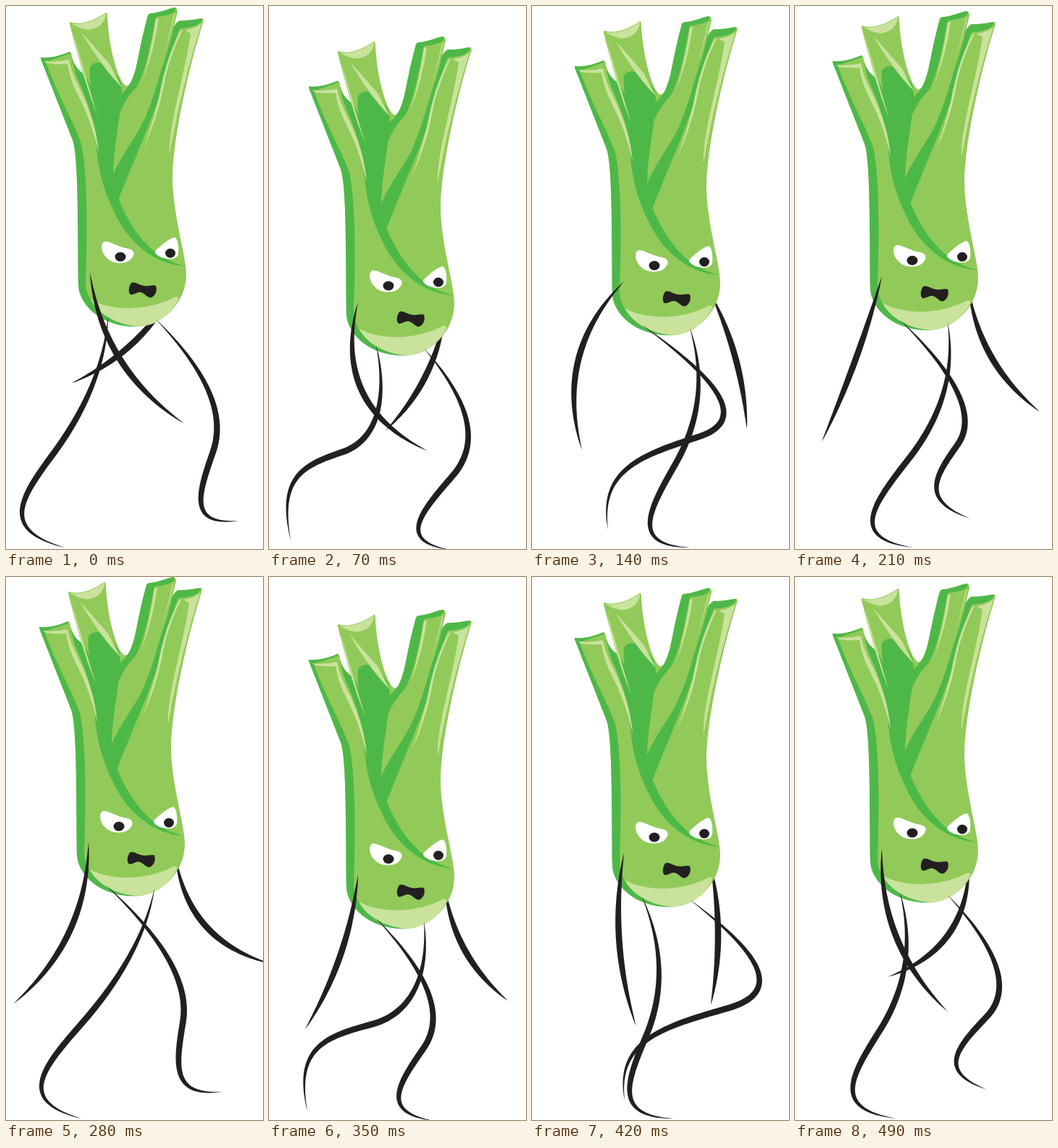
An HTML page with a canvas for the animation above (560 ms loop, 355 by 749 pixels).

```html
<!DOCTYPE html>
<html lang="en">
<head>
<meta charset="utf-8">
<title>Angry leek walking</title>
<style>
html, body { margin: 0; width: 100%; height: 100%; overflow: hidden; background: #fff; }
canvas { display: block; }
</style>
</head>
<body>
<canvas id="stage" width="355" height="749"></canvas>
<script>
const ctx = document.getElementById('stage').getContext('2d');
const STEP = 70, PHASES = 8;
const LIGHT = '#91ca58', DARK = '#4db848', PALE = '#c9e29c', INK = '#231f20', WHITE = '#fff';

// Body parts, back to front
const body = [
  // silhouette
  [LIGHT, `M48 73Q50 71 55 72C68 71 78 67 88 63Q91 64 91 70Q94 82 103 91L107 97L97 60L88 25
    Q87 21 92 23C106 26 124 19 138 9Q140 9 140 15C142 55 153 98 164 109Q168 112 172 106
    C181 88 187 45 196 13Q197 10 202 10C214 9 222 4 233 2Q237 3 237 8L230 36Q231 25 240 20
    C250 21 262 18 271 17Q274 18 272 23C254 80 230 180 230 240C231 290 249 345 249 370
    C249 410 215 442 180 442C130 442 100 410 100 385C100 290 99 205 92 185Z`],
  // shaded left side
  [DARK, `M48 73L92 185C100 205 99 290 100 385C102 415 135 445 186 442C140 436 112 410 110 385
    C113 300 112 225 104 190C96 165 70 120 55 77L88 66L88 63C76 68 64 72 48 71Z`],
  // shadow between the left stalks
  [DARK, 'M91 70Q94 84 104 91Q116 102 121 122L130 165L128 203Q124 160 104 112Q94 92 91 70Z'],
  // inner leaf and its long fold
  [DARK, `M116 84Q124 73 139 82Q151 91 158 104C165 128 150 175 148 232L156 268
    C172 305 198 348 248 359C205 357 168 325 150 285C132 250 125 215 124 180L130 168
    C120 130 114 100 116 84Z`],
  // right-hand fold
  [DARK, `M240 20C250 21 262 18 271 17C270 27 255 30 240 31C228 60 223 105 208 135
    C198 165 180 205 155 268L148 232C160 205 180 180 191 157C207 120 210 100 221 68
    Q229 43 231 32Q234 23 240 20Z`],
  // shaded edge of the third stalk
  [DARK, `M196 13Q197 10 202 10C214 9 222 4 233 2Q237 4 232 9Q222 14 207 15C201 45 195 85 181 111
    Q166 126 158 145L158 122Q176 108 181 80Q187 45 196 13Z`],
  // highlights
  [PALE, `M53 76Q70 78 87 74Q90 91 101 112Q125 160 128 203Q119 160 99 122Q88 101 85 80
    Q70 81 57 79Z`],
  [PALE, 'M90 24C106 27 124 20 138 10Q138 18 131 26C120 35 109 35 90 24Z'],
  [PALE, 'M104 36L143 80L160 112Q135 88 104 36Z'],
  [PALE, 'M92 35Q108 90 126 150Q104 95 92 35Z'],
  [PALE, 'M207 18L211 17Q205 60 189 102Q201 60 207 18Z'],
  [PALE, 'M234 9Q228 38 218 65Q227 36 232 12Z'],
  [PALE, 'M241 34L244 33Q226 68 217 115Q209 155 190 196Q208 145 214 112Q224 65 241 34Z'],
  [PALE, 'M247 33Q260 32 270 24C254 75 238 135 226 205C224 165 247 95 255 38Z'],
  [PALE, 'M117 405C150 422 197 420 232 402Q239 399 238 405C225 430 203 442 183 442C155 440 129 427 117 405Z'],
  // face
  [WHITE, `M134 326C140 321 150 331 170 335C180 338 177 345 172 350C165 356 150 356 142 350
    C132 343 130 330 134 326Z`],
  [WHITE, `M207 337C215 330 224 321 233 319C238 321 239 335 238 342C236 350 225 350 215 347
    C208 344 204 340 207 337Z`],
  [INK, 'M150.5 346a7.5 6.5 0 1 0 15 0a7.5 6.5 0 1 0 -15 0Z'],
  [INK, 'M220 341a7 6.5 0 1 0 14 0a7 6.5 0 1 0 -14 0Z'],
  [INK, `M173 382C178 379 185 386 192 386C198 387 203 384 207 386C209 392 207 399 201 402
    C196 404 192 396 186 395C181 394 177 399 172 398C168 394 170 386 173 382Z`]
].map(([color, d]) => [color, new Path2D(d)]);

// Key values for each phase of the walk. Both legs share one cycle, half a turn apart.
const shiftX = [0, 7, 11, 4, -2, 7, 11, 4];
const shiftY = [0, 40, 12, 5, -2, 43, 13, 7];
const stride = {
  kneeX: [306, 291, 223, 202, 160, 197, 347, 301],
  footX: [322, 250, 218, 163, 104, 53, 128, 265],
  footY: [710, 750, 747, 747, 747, 737, 722, 707],
  pitch: [-6, 9, 2, 8, 15, 78, 81, 20]
};
const rightLeg = { hip: [207, 432], kneeOffset: 0, footOffset: 0, delay: 0 };
const leftLeg = { hip: [141, 428], kneeOffset: -50, footOffset: -23, delay: PHASES / 2 };
// Swing in degrees from straight down; bow is the sideways bulge of the curve.
const leftArm = {
  shoulder: [116, 368], reach: 245,
  swing: [32, 25, -14, -20, -25, -19, 4, 22],
  bow: [-28, -47, -35, 5, 28, 13, -15, -27]
};
const rightArm = {
  shoulder: [236, 385], reach: 198,
  swing: [-47, -27, 15, 30, 41, 29, 0, -35],
  bow: [17, 15, 10, -20, -33, -18, 10, 35]
};

const radians = degrees => degrees * Math.PI / 180;
const add = (a, b, scale = 1) => [a[0] + b[0] * scale, a[1] + b[1] * scale];
const mix = (a, b, t) => [a[0] + (b[0] - a[0]) * t, a[1] + (b[1] - a[1]) * t];

function armCurves({ shoulder, reach, swing, bow }, phase, shift) {
  const angle = radians(swing[phase]);
  const side = [Math.cos(angle), -Math.sin(angle)];
  const start = add(shoulder, shift);
  const tip = add(start, [Math.sin(angle), Math.cos(angle)], reach - 0.45 * shift[1]);
  const bend = t => add(mix(start, tip, t), side, bow[phase] / 0.75);
  return [[start, bend(1 / 3), bend(2 / 3), tip]];
}

function legCurves({ hip, kneeOffset, footOffset, delay }, step, shift) {
  const phase = (step + delay) % PHASES;
  const start = add(hip, shift);
  const knee = add([stride.kneeX[phase] + kneeOffset, 557], shift);
  const foot = [stride.footX[phase] + footOffset, stride.footY[phase]];
  const pitch = radians(stride.pitch[phase]);
  const footLength = 84 - 12 * Math.cos(2 * Math.PI * phase / PHASES);
  const ankle = add(foot, [-Math.cos(pitch), -Math.sin(pitch)], footLength);
  const thigh = add(mix(start, knee, 0.5), [12, 0]);
  const shin = mix(knee, ankle, 0.36);
  return [[start, thigh, knee, shin], [shin, mix(knee, ankle, 0.72), ankle, foot]];
}

function pointOn([a, b, c, d], t) {
  const ab = mix(a, b, t), bc = mix(b, c, t), cd = mix(c, d, t);
  return mix(mix(ab, bc, t), mix(bc, cd, t), t);
}

// A brush stroke, thick in the middle and pointed at both ends
function drawLimb(curves) {
  const count = 40;
  const points = [curves[0][0]];
  for (const curve of curves) {
    for (let i = 1; i <= count; i++) points.push(pointOn(curve, i / count));
  }
  const last = points.length - 1;
  const left = [], right = [];
  points.forEach((point, i) => {
    const [ax, ay] = points[Math.max(0, i - 1)];
    const [bx, by] = points[Math.min(last, i + 1)];
    const half = 4.3 * Math.max(0, Math.sin(Math.PI * i / last)) ** 0.8;
    const across = [ay - by, bx - ax], scale = half / Math.hypot(...across);
    left.push(add(point, across, scale));
    right.unshift(add(point, across, -scale));
  });
  ctx.fillStyle = INK;
  ctx.beginPath();
  for (const point of left.concat(right)) ctx.lineTo(...point);
  ctx.fill();
}

function drawBody([x, y]) {
  ctx.save();
  ctx.translate(x, y);
  for (const [color, path] of body) {
    ctx.fillStyle = color;
    ctx.fill(path);
  }
  ctx.restore();
}

function draw(now) {
  const phase = Math.floor(now / STEP) % PHASES;
  const shift = [shiftX[phase], shiftY[phase]];
  ctx.fillStyle = WHITE;
  ctx.fillRect(0, 0, 355, 749);
  drawLimb(armCurves(rightArm, phase, shift));
  drawBody(shift);
  drawLimb(legCurves(leftLeg, phase, shift));
  drawLimb(legCurves(rightLeg, phase, shift));
  drawLimb(armCurves(leftArm, phase, shift));
}

const start = performance.now();
function tick() {
  draw(performance.now() - start);
  requestAnimationFrame(tick);
}
tick();
</script>
</body>
</html>
```
